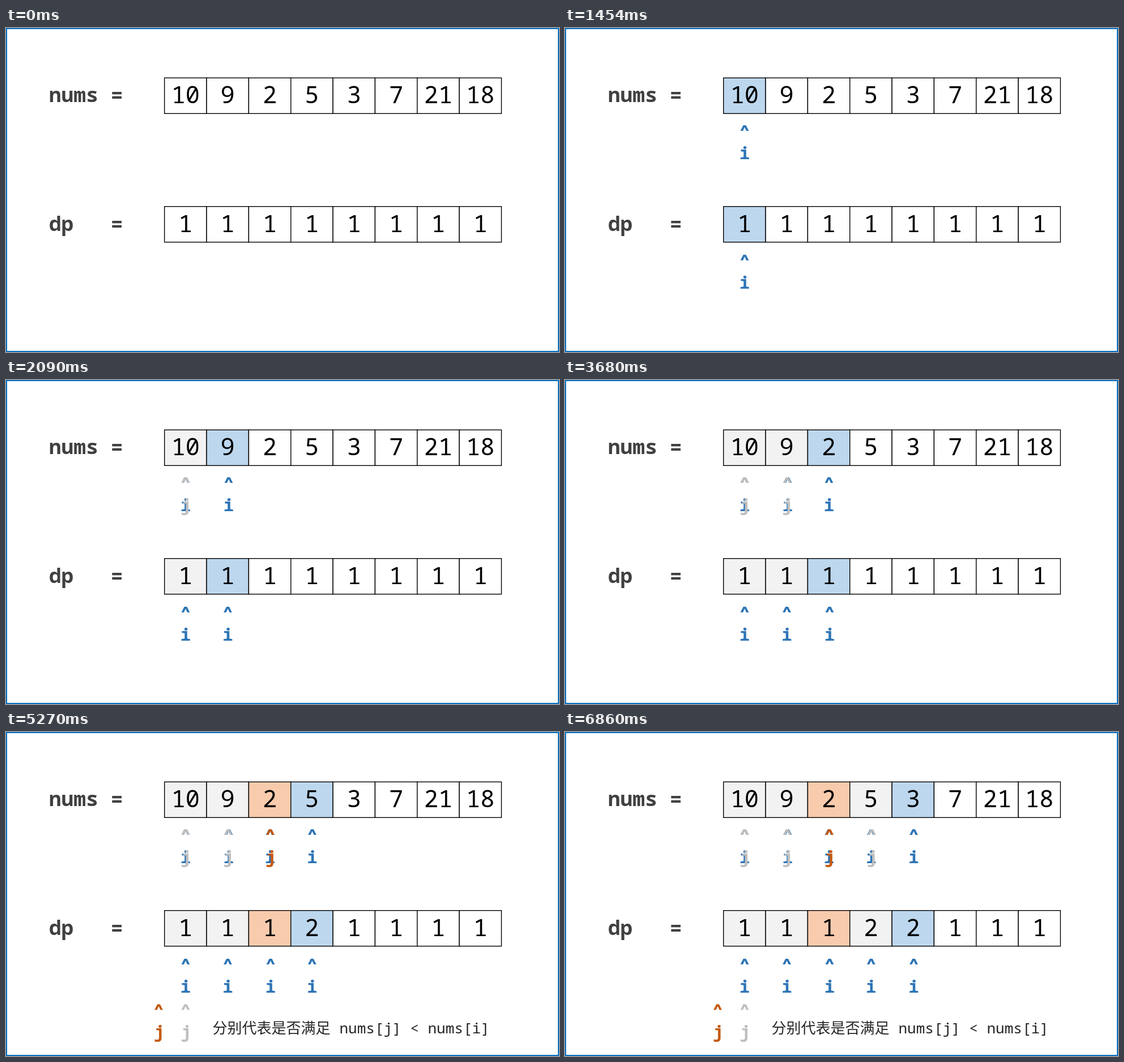
Recreate the animation shown at these times as an HTML page. Size 976 by 573 pixels, loop 8000 ms.

```html
<!DOCTYPE html>
<html lang="zh">
<head>
<meta charset="utf-8">
<style>
  html, body { margin: 0; width: 100%; height: 100%; overflow: hidden; background: #fff; }
  svg { display: block; width: 976px; height: 573px; }
  text { font-family: "Noto Sans Mono", "DejaVu Sans Mono", monospace; white-space: pre; }
  .label { font-size: 36.3px; font-weight: 700; fill: #404040; }
  .value { font-size: 42px; text-anchor: middle; fill: #000; }
  .letter { font-size: 31px; font-weight: 700; text-anchor: middle; }
  .note { font-size: 26px; fill: #262626; }
  .han { font-family: "Noto Sans CJK SC", "Noto Sans CJK", sans-serif; }
</style>
</head>
<body>
<svg id="stage" viewBox="0 0 976 573"></svg>
<script>
const LOOP = 8000, FIRST = 500, STEP = 1590;
const LEFT = 279.7, PITCH = 74.34, HEIGHT = 63, ROWS = [88.3, 315.7];
const BLUE = '#2E75B6', ORANGE = '#C55A11', GRAY = '#BFBFBF';
const LIGHT_BLUE = '#BDD7EE', LIGHT_ORANGE = '#F8CBAD', LIGHT_GRAY = '#F2F2F2';
const nums = [10, 9, 2, 5, 3, 7, 21, 18];
const upperX = [317, 393, 466, 540.5, 615.5];
const lowerX = [317, 391.5, 467, 540.3, 615.5];
const innerX = [317, 392, 466.7, 541.5];

// Longest increasing subsequence ending at each index
const lengths = [];
nums.forEach((n, i) => {
  lengths[i] = 1 + Math.max(0, ...lengths.filter((_, j) => nums[j] < n));
});

const stage = document.getElementById('stage');

function add(parent, tag, attrs, content) {
  const node = document.createElementNS('http://www.w3.org/2000/svg', tag);
  for (const key in attrs) node.setAttribute(key, attrs[key]);
  if (content !== undefined) node.textContent = content;
  return parent.appendChild(node);
}

function pointer(parent, letter, x, top, fill) {
  const g = add(parent, 'g', { fill, transform: `translate(${x} ${top})` });
  add(g, 'path', { d: 'M-2.4 0H2.4L7.4 10H3L0 3.6L-3 10H-7.4Z' });
  add(g, 'text', { class: 'letter', x: letter === 'j' ? 1 : 0, y: 59.5 }, letter);
  return g;
}

function show(node, visible) {
  node.setAttribute('visibility', visible ? 'visible' : 'hidden');
}

add(stage, 'rect', { x: 1, y: 1, width: 974, height: 571, fill: '#fff', stroke: '#0070C0', 'stroke-width': 2 });
add(stage, 'text', { class: 'label', x: 75.8, y: 131 }, 'nums =');
add(stage, 'text', { class: 'label', x: 75.8, y: 359 }, 'dp   =');

const rows = ROWS.map(y => nums.map((n, k) => {
  const x = LEFT + k * PITCH;
  return {
    box: add(stage, 'rect', { x, y, width: PITCH, height: HEIGHT, stroke: '#000', 'stroke-width': 1.4 }),
    text: add(stage, 'text', { class: 'value', x: x + PITCH / 2, y: y + 45 }, n)
  };
}));

const outer = upperX.map((x, k) => [
  pointer(stage, 'i', x, 172, BLUE),
  pointer(stage, 'i', lowerX[k], 401, BLUE)
]);
const inner = innerX.map(x => pointer(stage, 'j', x, 172, GRAY));

const legend = add(stage, 'g', {});
pointer(legend, 'j', 269.5, 481.5, ORANGE);
pointer(legend, 'j', 317, 481.5, GRAY);
add(legend, 'text', { class: 'note han', x: 364.5, y: 532.5 }, '分别代表是否满足');
add(legend, 'text', { class: 'note', x: 588.5, y: 532.5 }, 'nums[j] < nums[i]');

function cellFill(k, i) {
  if (k > i) return '#fff';
  if (k === i) return LIGHT_BLUE;
  return nums[k] < nums[i] ? LIGHT_ORANGE : LIGHT_GRAY;
}

function render(time) {
  const i = Math.floor((time % LOOP - FIRST) / STEP);
  rows.forEach(cells => cells.forEach((cell, k) => cell.box.setAttribute('fill', cellFill(k, i))));
  rows[1].forEach((cell, k) => { cell.text.textContent = k <= i ? lengths[k] : 1; });
  outer.forEach((pair, k) => pair.forEach(node => show(node, k <= i)));
  inner.forEach((node, j) => {
    show(node, j < i);
    node.setAttribute('fill', nums[j] < nums[i] ? ORANGE : GRAY);
  });
  show(legend, i >= 3);
}

const start = performance.now();
function tick() {
  render(performance.now() - start);
  requestAnimationFrame(tick);
}
tick();
</script>
</body>
</html>
```
